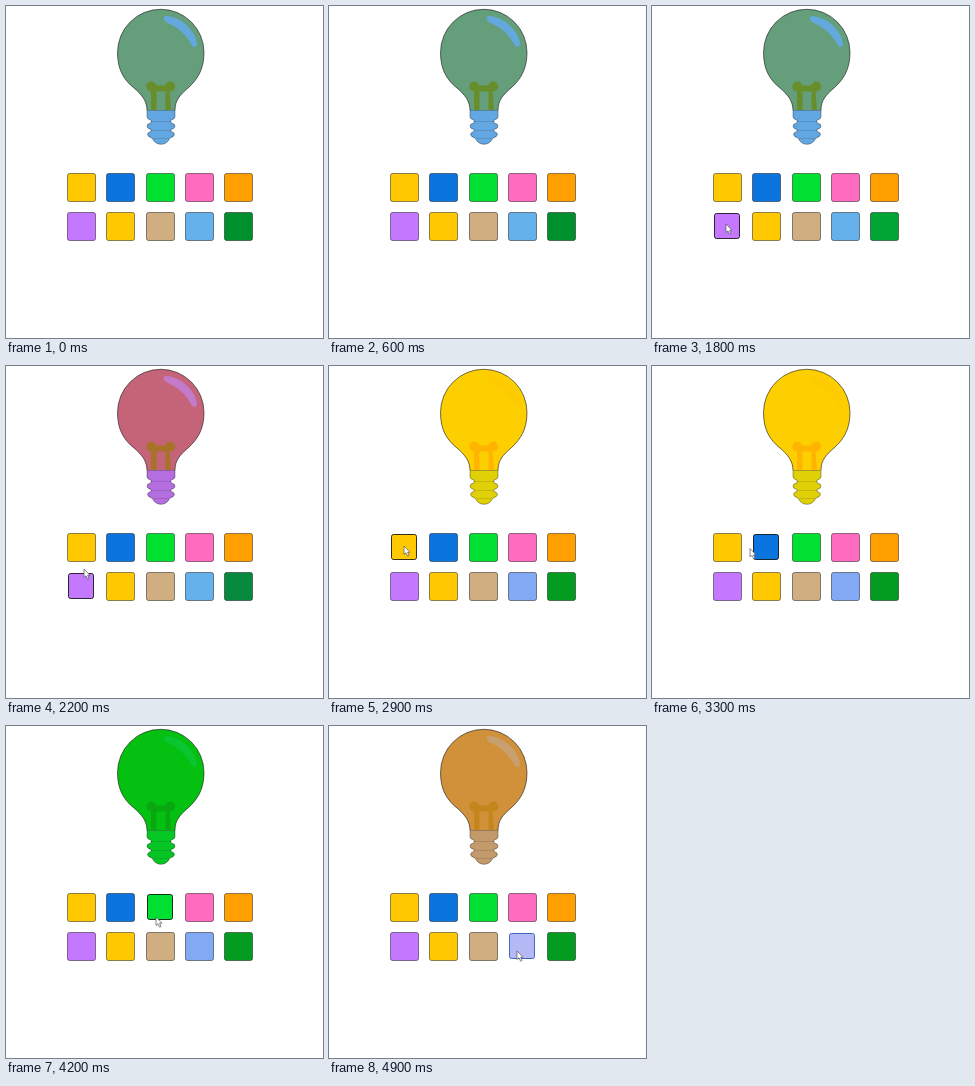
An HTML page for the animation above (5000 ms loop, 317 by 332 pixels).

```html
<!DOCTYPE html>
<html lang="en">
<head>
<meta charset="utf-8">
<title>Colour bulb</title>
<style>
html, body { margin: 0; width: 100%; height: 100%; overflow: hidden; background: #fff; }
svg { display: block; width: 100%; height: 100%; }
</style>
</head>
<body>
<svg viewBox="0 0 317 332">
  <path id="glass" stroke="#111" stroke-opacity=".75" stroke-width=".8"
    d="M111.500 46.500A43.200 43.200 0 0 1 198 46.500C198 64 191 74 182 82C174 89 169 94 169 104.500H141C141 95 136 89 128 82C118 74 111.500 64 111.500 46.500Z"/>
  <path id="shine" d="M160 10C173 10.500 188 22 191 37C191 42 187 42 185 38C179 27 171 21 160 16C157 14 157 10.500 160 10Z"/>
  <g id="filament">
    <circle cx="145.300" cy="80.500" r="5"/>
    <circle cx="164.200" cy="80.500" r="5"/>
    <path d="M145 79.500H165V84H163.500L165 104H159.500V85.500H150.500V104H145Z"/>
  </g>
  <path id="base" stroke="#111" stroke-opacity=".6" stroke-width=".6"
    d="M141 104.500V111Q141 113 145 114V117Q141 117.500 141 120Q141 122.500 145 123.500V125.500Q141.500 126.500 141.500 128.500Q142 131 146 132Q149 138.300 155 138.300Q161 138.300 164 132Q168 131 168.500 128.500Q168.500 126.500 165 125.500V123.500Q169 122.500 169 120Q169 117.500 165 117V114Q169 113 169 111V104.500"/>
  <path fill="none" stroke="#000" stroke-opacity=".12" d="M145 115.500H165M145 124.500H165M147 132.500H163"/>
  <g id="buttons"></g>
  <path id="cursor" d="M0 0V8.500L2 6.800L3.600 10.200L5 9.500L3.600 6.300H6Z" fill="#fff" stroke="#555" stroke-width=".7"/>
</svg>
<script>
const LOOP = 5000, STEP = 100, SIZE = 29, REACH = 4;
const $ = id => document.getElementById(id);

const swatches = ['#ffc800', '#0c74de', '#00e030', '#ff6cbf', '#ffa000',
                  '#c478ff', '#ffc800', '#d0ae82', '#65b1ec', '#009b2a'];

// start time, glass, shine, filament, base
const bulbs = [
  [0, '#659e7a', '#63a9dd', '#688e2c', '#63a7e2'],
  [1900, '#c56479', '#c37ac8', '#a8722a', '#b46ee0'],
  [2600, '#fecf00', '#fecb00', '#ffb400', '#e0d008'],
  [3600, '#03626e', '#0a5fc4', '#0a5028', '#0a62c8'],
  [4000, '#04c010', '#0ac430', '#0aa810', '#06c626'],
  [4500, '#d0913a', '#c8a070', '#c4861c', '#c39a6c']
];

// time, tip x, tip y
const path = [
  [1300, 96, 245], [1800, 74, 218], [2000, 74, 215], [2200, 78, 203],
  [2500, 76, 184], [2900, 75, 180], [3100, 80, 183], [3500, 116, 182],
  [3700, 124, 181], [4000, 152, 180], [4200, 150, 191], [4450, 150, 215],
  [4600, 152, 218], [4800, 184, 222], [4900, 188, 225], [5000, 188, 225]
];

const skyTones = [[0, '#65b1ec'], [2500, '#82a9f3']];
const greenTones = [[0, '#008f2d'], [700, '#00a535'], [1900, '#078a40'], [2500, '#039c20']];

const buttons = swatches.map((fill, i) => {
  const rect = document.createElementNS('http://www.w3.org/2000/svg', 'rect');
  $('buttons').append(rect);
  return { rect, fill, x: Math.round(61 + i % 5 * 39.3), y: i < 5 ? 167 : 206 };
});

const latest = (list, t) => list.filter(item => item[0] <= t).pop();

function cursorAt(t) {
  if (t < path[0][0]) return null;
  const i = path.findIndex(p => p[0] > t);
  const [t0, x0, y0] = path[i - 1], [t1, x1, y1] = path[i];
  const k = (t - t0) / (t1 - t0);
  return { x: x0 + (x1 - x0) * k, y: y0 + (y1 - y0) * k };
}

function drawButton(button, tip) {
  const { rect, x, y, fill } = button;
  const near = (p, edge) => p >= edge - REACH && p <= edge + SIZE;
  const over = tip && near(tip.x, x) && near(tip.y, y);
  const inset = over ? 1.5 : 0.5;
  const side = over ? SIZE - 4 : SIZE - 1;
  const sky = button === buttons[8];
  const attrs = {
    x: x + inset, y: y + inset, width: side, height: side, rx: 2,
    fill: over && sky ? '#b4b8f4' : fill,
    stroke: over && sky ? '#1a50a8' : '#000',
    'stroke-opacity': over ? .8 : .45
  };
  for (const name in attrs) rect.setAttribute(name, attrs[name]);
}

function draw(time) {
  const t = Math.floor(time % LOOP / STEP) * STEP;
  const colours = latest(bulbs, t);
  ['glass', 'shine', 'filament', 'base'].forEach((id, i) => $(id).setAttribute('fill', colours[i + 1]));

  const tip = cursorAt(t);
  buttons[8].fill = latest(skyTones, t)[1];
  buttons[9].fill = latest(greenTones, t)[1];
  buttons.forEach(button => drawButton(button, tip));

  $('cursor').setAttribute('visibility', tip ? 'visible' : 'hidden');
  if (tip) $('cursor').setAttribute('transform', `translate(${tip.x} ${tip.y})`);
}

const start = performance.now();
function tick() {
  draw(performance.now() - start);
  requestAnimationFrame(tick);
}
tick();
</script>
</body>
</html>
```
